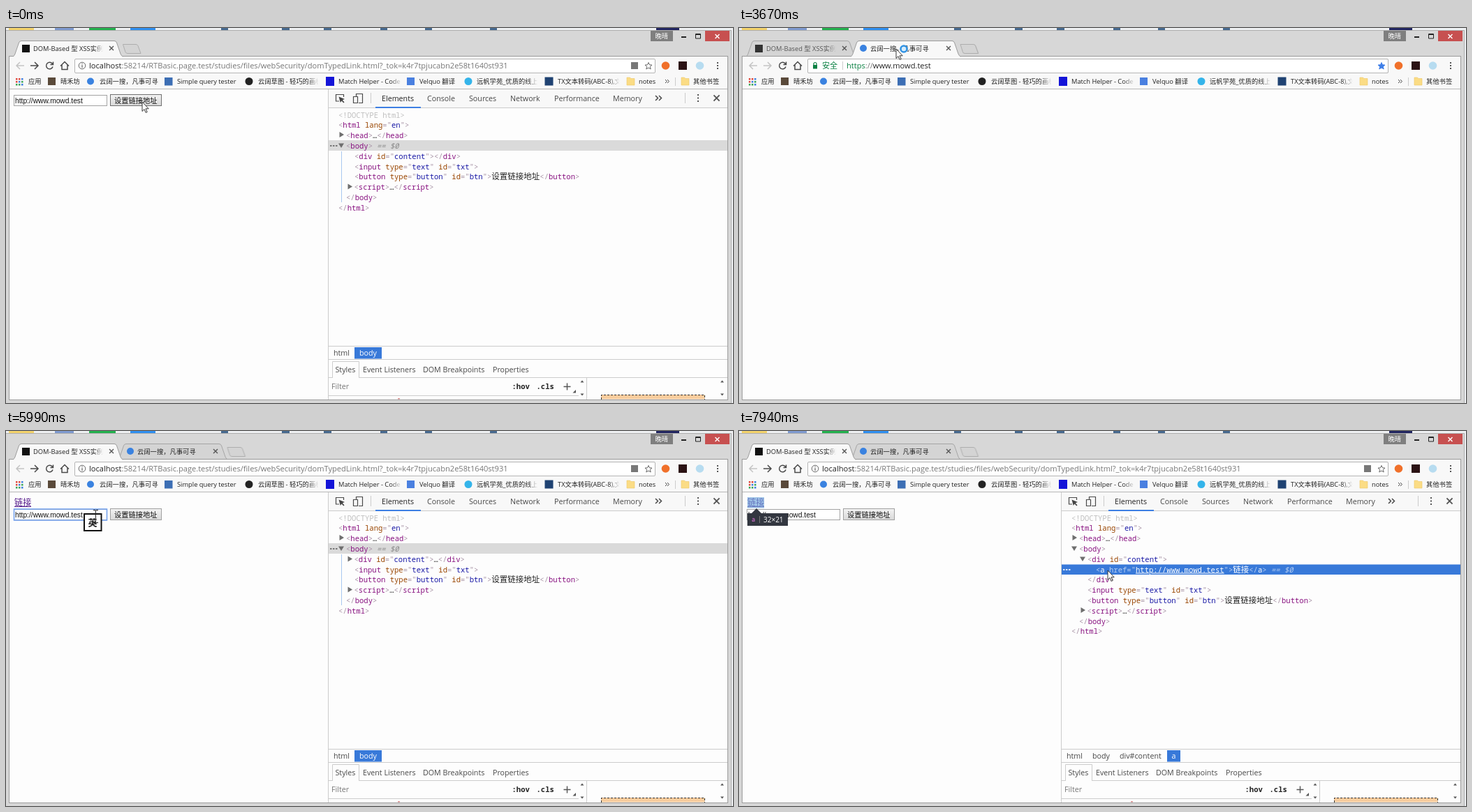
Animation of 1041x538 px, one loop 8000 ms. Source, as an HTML page:

```html
<!DOCTYPE html>
<html lang="zh">
<head>
<meta charset="utf-8">
<title>DOM-Based XSS</title>
<style>
html, body { margin: 0; width: 100%; height: 100%; overflow: hidden; background: #d7d7d7; }
svg { display: block; width: 100vw; height: 100vh; }
text { white-space: pre; font: 9.3px "Open Sans", "Noto Sans CJK SC", sans-serif; fill: #222; }
.url { font-size: 11.1px; fill: #777; }
.ui { font-size: 10.7px; fill: #484848; }
.field { font: 10.25px "Liberation Sans", "Noto Sans CJK SC", sans-serif; fill: #111; }
.link { font-size: 12.2px; fill: #551a8b; }
.code { font: 10.56px "Noto Sans Mono", "DejaVu Sans Mono", "Noto Sans CJK SC", monospace; fill: #a894a6; }
.t { fill: #881280; }
.n { fill: #994500; }
.v { fill: #1a1aa6; }
.c { fill: #222; }
.zh { font-size: 11.5px; fill: #222; }
.eq { fill: #888; font-style: italic; }
.mini { font-size: 8.65px; fill: #ee78e6; }
.size { font-size: 10px; }
.light, .light tspan { fill: #fff; }
.light .dim { fill: #b9d0f2; }
.line { fill: none; stroke: #ccc; }
.icon { fill: none; stroke: #4a4a4a; stroke-width: 1.5; }
.off { stroke: #c4c4c4; }

/* Everything runs on one 8 s clock: 1% = 80 ms. */
.on { animation: 8s step-end infinite; }
.bare { animation-name: bare; }
.linked { animation-name: linked; }
.closed { animation-name: closed; }
.open { animation-name: open; }
.form { animation-name: form; }
.tail { animation-name: tail; }
.tabbed { animation-name: tabbed; }
.plus { animation-name: plus; }
.loading { animation-name: loading; }
.loaded { animation-name: loaded; }
.away { animation-name: away; }
.focus { animation-name: focus; }
.ime { animation-name: ime; }
.hover-div { animation-name: hover-div; }
.hover-a { animation-name: hover-a; }
.sel-body { animation-name: sel-body; }
.sel-a { animation-name: sel-a; }
.body-line { animation-name: body-line; }
.arrow { animation-name: arrow; }
.hand { animation-name: hand; }
.busy { animation-name: busy; }
.beam { animation-name: beam; }
.flash { animation: flash 8s linear infinite; }
.spin { transform-origin: 178px 29px; animation: spin 1s linear infinite; }
.pointer { animation: pointer 8s infinite; }

@keyframes bare { 0% { opacity: 1 } 5.2%, 100% { opacity: 0 } }
@keyframes linked { 0% { opacity: 0 } 5.2%, 100% { opacity: 1 } }
@keyframes closed { 0%, 86.5%, 100% { opacity: 0 } 5.2% { opacity: 1 } }
@keyframes open { 0% { opacity: 0 } 86.5%, 100% { opacity: 1 } }
@keyframes form { 0% { transform: none } 5.2%, 100% { transform: translateY(16px) } }
@keyframes tail { 0% { transform: none } 86.5%, 100% { transform: translateY(29.6px) } }
@keyframes tabbed { 0% { opacity: 0 } 22.4%, 100% { opacity: 1 } }
@keyframes plus { 0% { transform: none } 22.4%, 100% { transform: translateX(149.5px) } }
@keyframes loading { 0%, 38.8%, 100% { opacity: 0 } 22.4% { opacity: 1 } }
@keyframes loaded { 0% { opacity: 0 } 38.8%, 100% { opacity: 1 } }
@keyframes away { 0%, 56.5%, 100% { opacity: 0 } 45.87% { opacity: 1 } }
@keyframes focus { 0%, 86.5%, 100% { opacity: 0 } 73.37% { opacity: 1 } }
@keyframes ime { 0%, 83.2%, 100% { opacity: 0 } 73.37% { opacity: 1 } }
@keyframes hover-div { 0%, 91.87%, 100% { opacity: 0 } 79.9% { opacity: 1 } }
@keyframes hover-a { 0% { opacity: 0 } 91.87%, 100% { opacity: 1 } }
@keyframes sel-body { 0% { opacity: 1 } 99.25%, 100% { opacity: 0 } }
@keyframes sel-a { 0% { opacity: 0 } 99.25%, 100% { opacity: 1 } }
@keyframes body-line { 0%, 99.25%, 100% { opacity: 0 } 86.5% { opacity: 1 } }
@keyframes arrow { 0%, 21%, 75%, 100% { opacity: 1 } 13.75%, 69.87% { opacity: 0 } }
@keyframes hand { 0%, 21%, 100% { opacity: 0 } 13.75% { opacity: 1 } }
@keyframes busy { 0%, 53.1%, 100% { opacity: 0 } 21% { opacity: 1 } }
@keyframes beam { 0%, 75%, 100% { opacity: 0 } 69.87% { opacity: 1 } }
@keyframes flash { 0%, 5.19% { opacity: 0 } 5.2% { opacity: 1 } 18%, 100% { opacity: 0 } }
@keyframes spin { to { transform: rotate(360deg) } }
@keyframes pointer {
  0% { transform: translate(195px, 106px) }
  6.93% { transform: translate(195px, 106px); animation-timing-function: steps(6, start) }
  17.21% { transform: translate(18px, 103px) }
  20.72% { transform: translate(18px, 103px); animation-timing-function: steps(7, start) }
  31.98% { transform: translate(171px, 186px) }
  32.25% { transform: translate(171px, 186px); animation-timing-function: steps(3, start) }
  37.28% { transform: translate(115px, 262px); animation-timing-function: steps(5, start) }
  45.68% { transform: translate(225px, 30px) }
  47.69% { transform: translate(225px, 30px); animation-timing-function: steps(4, start) }
  54.94% { transform: translate(100px, 27px) }
  58.47% { transform: translate(100px, 27px); animation-timing-function: steps(4, start) }
  66.34% { transform: translate(124px, 117px) }
  75.02% { transform: translate(124px, 117px); animation-timing-function: steps(4, start) }
  81.59% { transform: translate(510px, 181px); animation-timing-function: steps(3, start) }
  86.51% { transform: translate(489px, 181px) }
  91.87% { transform: translate(489px, 181px); animation-timing-function: steps(2, start) }
  95.62%, 100% { transform: translate(528px, 200px) }
}
</style>
</head>
<body>
<svg viewBox="0 0 1041 538" preserveAspectRatio="none">
<defs>
  <linearGradient id="fade"><stop stop-color="#f8f8f8" stop-opacity="0"/><stop offset=".65" stop-color="#f8f8f8"/></linearGradient>
  <linearGradient id="fadeOff"><stop stop-color="#d4d4d4" stop-opacity="0"/><stop offset=".65" stop-color="#d4d4d4"/></linearGradient>
  <linearGradient id="face" x2="0" y2="1"><stop stop-color="#f3f3f3"/><stop offset="1" stop-color="#d9d9d9"/></linearGradient>
  <path id="tab" d="M10 41Q12 40 13 37L18.5 21Q19.5 18.5 22 18.5H155Q157.5 18.5 158.5 21L164 37Q165 40 167.5 41"/>
  <path id="plus" d="M167.5 23.5H186Q188 23.5 189 25.5L193 36.5H174Q172 36.5 171 34.5Z" fill="#d4d4d4" stroke="#adadad"/>
  <path id="x" d="M-3-3L3 3M3-3L-3 3" fill="none" stroke="#555" stroke-width="1.4"/>
  <path id="star" d="M0-5L1.5-1.7 5-1.4 2.3.9 3.2 4.5 0 2.5-3.2 4.5-2.3.9-5-1.4-1.5-1.7Z"/>
  <path id="right" d="M-2.5-4L4 0-2.5 4Z" fill="#6e6e6e"/>
  <path id="down" d="M-4-2.5H4L0 4Z" fill="#6e6e6e"/>
  <path id="folder" d="M0 0H4.5L6 1.5H11V11H0Z" fill="#fbdc85" stroke="#ecc766" stroke-width=".6"/>
  <path id="back" d="M6 0H-5M0-5L-5 0 0 5"/>
  <path id="dots" d="M464 0h2.500v2h-2.500zM468 0h2.500v2h-2.500zM472 0h2.500v2h-2.500z"/>
  <g id="scroll" fill="#555"><path d="M-2.5 1.5L0-1.5 2.5 1.5Z"/><path d="M-2.5 17.5L0 20.5 2.5 17.5Z"/></g>
</defs>

<!-- desktop edge and window frame -->
<rect width="1041" height="538" fill="#eef0f2"/>
<path d="M4 0H40V3H4Z" fill="#f3d36b"/>
<path d="M70 0H97V3H70Z" fill="#7f9ad0"/>
<path d="M119 0H157V3H119Z" fill="#23b14d"/>
<path d="M178 0H214V3H178Z" fill="#2f8ff0"/>
<path d="M308 0h10v3h-10zM395 0h11v3h-11zM455 0h11v3h-11zM536 0h10v3h-10zM600 0h10v3h-10zM693 0h10v3h-10z" fill="#46698f"/>
<path d="M931 0H964V3H931Z" fill="#20245f"/>
<rect x="-1" y="3.5" width="1039.5" height="540" fill="#d7d7d7" stroke="#adadad"/>
<rect x="923" y="4" width="32" height="15" fill="#7f7f7f"/>
<text class="light" x="929.5" y="15">晚晴</text>
<path d="M967 13H974" stroke="#222" stroke-width="2"/>
<path d="M987.5 8.5H994.5V15H987.5ZM987 9.5H995" fill="none" stroke="#222"/>
<rect x="1001" y="4" width="35" height="15" fill="#c75050"/>
<path d="M1015.5 9L1021.5 15M1021.5 9L1015.5 15" stroke="#fff" stroke-width="1.4"/>
<rect x="4.5" y="40.5" width="1029" height="493" fill="#fdfdfd" stroke="#9b9b9b"/>

<!-- tabs -->
<g class="on tabbed">
  <use href="#tab" x="150" fill="#d4d4d4" stroke="#a5a5a5"/>
  <path d="M160 40.5H320" stroke="#9b9b9b"/>
  <use href="#x" x="300" y="29"/>
</g>
<g class="on loading">
  <path class="spin" d="M174.5 27A4 4 0 0 1 177 25" fill="none" stroke="#888" stroke-width="1.2"/>
  <text x="188" y="32.5">正在加载...</text>
</g>
<g class="on loaded">
  <circle cx="178" cy="29" r="5" fill="#3a82e0"/>
  <text x="188" y="32.5">云阔一搜，凡事可寻</text>
</g>
<use href="#plus" class="on plus"/>
<rect x="5" y="41" width="1028" height="47" fill="#f8f8f8"/>
<use href="#tab" fill="#f8f8f8" stroke="#9b9b9b"/>
<rect x="23" y="24" width="11" height="11" fill="#111"/>
<text x="39" y="32.5">DOM-Based 型 XSS实例</text>
<rect x="126" y="22" width="20" height="15" fill="url(#fade)"/>
<use href="#x" x="151" y="29"/>

<!-- toolbar -->
<use href="#back" x="20" y="54" class="icon off"/>
<use href="#back" transform="translate(41 54) scale(-1 1)" class="icon"/>
<path class="icon" d="M66.5 51.5A4.8 4.8 0 1 0 67 55.5M67.5 48.5V52.5H63.5"/>
<path class="icon" d="M78 54.5L84 48.5 90 54.5M80 53V59.5H88V53"/>
<rect x="98.5" y="44.5" width="831" height="20" rx="1.5" fill="#fff" stroke="#b5b5b5"/>
<circle cx="109" cy="54" r="4.8" fill="none" stroke="#666"/>
<path d="M109 53V57M109 50.8V52" stroke="#666" stroke-width="1.2"/>
<text class="url" x="119" y="58"><tspan class="c">localhost</tspan>:58214/RTBasic.page.test/studies/files/webSecurity/domTypedLink.html?_tok=k4r7tpjucabn2e58t1640st931</text>
<rect x="895" y="49" width="10" height="10" fill="#777"/>
<use href="#star" x="920" y="54.5" fill="none" stroke="#666"/>
<circle cx="944.5" cy="54" r="5.8" fill="#f0702a"/>
<rect x="963" y="48" width="12" height="12" fill="#2b1214"/>
<circle cx="993.5" cy="54" r="5.8" fill="#b7dcf0"/>
<path d="M1018 49h2v2h-2zM1018 53h2v2h-2zM1018 57h2v2h-2z" fill="#555"/>

<!-- bookmarks -->
<g transform="translate(14 72)">
  <path d="M0 0h2.5v2.5h-2.5zM4 0h2.5v2.5h-2.5zM0 4h2.5v2.5h-2.5z" fill="#e04a3f"/>
  <path d="M8 0h2.5v2.5h-2.5zM4 4h2.5v2.5h-2.5zM8 8h2.5v2.5h-2.5z" fill="#3f7fe0"/>
  <path d="M8 4h2.5v2.5h-2.5zM0 8h2.5v2.5h-2.5zM4 8h2.5v2.5h-2.5z" fill="#3aa757"/>
</g>
<text y="80.3"><tspan x="32">应用</tspan><tspan x="78">晴禾坊</tspan><tspan x="134">云阔一搜，凡事可寻</tspan><tspan x="245">Simple query tester</tspan><tspan x="361">云阔草图 - 轻巧的画板</tspan><tspan x="476">Match Helper - Code</tspan><tspan x="592">Velquo 翻译</tspan><tspan x="674">远帆学苑_优质的线上</tspan><tspan x="790">TX文本转码(ABC-8),文</tspan><tspan x="906">notes</tspan><tspan x="984">其他书签</tspan></text>
<g fill="url(#fade)"><path d="M432 69h24v16h-24z"/><path d="M551 69h24v16h-24z"/><path d="M747 69h22v16h-22z"/><path d="M863 69h24v16h-24z"/></g>
<rect x="60" y="71" width="11" height="11" fill="#5a4a3a"/>
<circle cx="121" cy="76.5" r="5" fill="#3a82e0"/>
<rect x="227" y="71" width="11.5" height="11.5" fill="#3c6eb4"/>
<circle cx="348" cy="76.5" r="5.5" fill="#222"/>
<rect x="458" y="70" width="12" height="13" fill="#1414d8"/>
<rect x="574" y="71" width="11" height="11" fill="#4a80e0"/>
<circle cx="662" cy="76.5" r="5.5" fill="#34b4ea"/>
<rect x="771.5" y="70.5" width="12" height="12" fill="#1f4272"/>
<use href="#folder" x="889" y="71"/><use href="#folder" x="967" y="71"/>
<path d="M944 74L946.5 76.5 944 79M947 74L949.5 76.5 947 79" fill="none" stroke="#444"/>
<path class="line" d="M958.5 71V83"/>
<path d="M5 87.5H1033" stroke="#b8b8b8"/>

<!-- page -->
<g class="on linked">
  <text class="link" x="12" y="107.3">链接</text>
  <path d="M12 108.5H36" stroke="#551a8b"/>
</g>
<g class="on form">
  <rect x="11.5" y="96.5" width="133" height="15" fill="#fff" stroke="#a3a3a3"/>
  <rect class="on focus" x="11.5" y="96" width="133" height="16" fill="none" stroke="#6f9fee" stroke-width="1.5"/>
  <text class="field" x="13" y="107.5">http://www.mowd.test</text>
  <rect x="149.5" y="95.5" width="73" height="16" fill="url(#face)" stroke="#a0a0a0"/>
  <rect class="on bare" x="149.5" y="95.5" width="73" height="16" fill="none" stroke="#707070"/>
  <text class="field" x="155" y="107.7">设置链接地址</text>
</g>
<g class="on hover-div">
  <rect x="12" y="95" width="443" height="15.5" fill="#6fa8dc" fill-opacity=".66"/>
  <path d="M12 118H18L25 111 32 118H127V136H12Z" fill="#333740"/>
  <text class="code mini" x="18" y="130">div#content</text>
  <path d="M81.5 122V132" stroke="#777"/>
  <text class="light size" x="86" y="130.5">574×21</text>
</g>
<g class="on hover-a">
  <rect x="12" y="95" width="24" height="15.5" fill="#6fa8dc" fill-opacity=".66"/>
  <path d="M12 118H18L25 111 32 118H70V136H12Z" fill="#333740"/>
  <text class="code mini" x="18" y="130">a</text>
  <path d="M29.5 122V132" stroke="#777"/>
  <text class="light size" x="35" y="130.5">32×21</text>
</g>
<g class="on ime">
  <rect x="112" y="119" width="24.5" height="24" fill="#fff" stroke="#111" stroke-width="2"/>
  <text x="117.5" y="135.5" style="font-size:13px;font-weight:700">英</text>
</g>

<!-- developer tools -->
<rect x="462" y="88" width="571" height="26" fill="#f8f8f8"/>
<path class="line" d="M461.5 88V533M462 114.5H1033"/>
<path class="icon" style="stroke-width:1.2" d="M477 105H472.5V95.5H483.5V99M501.5 98V94.5H510.5V107.5H505M497.5 98.5H503.5V107.5H497.5Z"/>
<path d="M476.5 98.5L485 102 481.8 103.3 484.5 106.5 483.3 107.5 480.6 104.4 478.8 107Z" fill="#444"/>
<path class="line" d="M522.5 93V108M972.5 93V108"/>
<text class="ui" y="104.8"><tspan x="538" class="c">Elements</tspan><tspan x="603">Console</tspan><tspan x="663">Sources</tspan><tspan x="722">Network</tspan><tspan x="785">Performance</tspan><tspan x="869">Memory</tspan></text>
<rect x="529" y="113" width="65" height="2" fill="#3d7fe3"/>
<path class="icon" d="M930 97L933.5 100.5 930 104M935 97L938.5 100.5 935 104"/>
<path d="M990 95h2v2h-2zM990 99.5h2v2h-2zM990 104h2v2h-2z" fill="#555"/>
<use href="#x" transform="translate(1017.5 100.5) scale(1.35)"/>

<!-- element tree -->
<g class="on sel-body">
  <rect x="462" y="161" width="571" height="15" fill="#dadada"/>
  <use href="#dots" y="168" fill="#777"/>
  <path d="M480.5 177V250" stroke="#a8c8f0"/>
  <text class="code eq" x="531" y="172.7">== $0</text>
</g>
<path class="on body-line" d="M480.5 250V280" stroke="#a8c8f0"/>
<rect class="on hover-div" x="465" y="177" width="564" height="14" rx="3" fill="#ebf2fc"/>
<rect class="on hover-a" x="465" y="192" width="564" height="14" rx="3" fill="#ebf2fc"/>
<text class="code" x="476" y="128.5" style="fill:#c0c0c0">&lt;!DOCTYPE html&gt;</text>
<text class="code" x="476" y="143.3">&lt;<tspan class="t">html</tspan> <tspan class="n">lang</tspan>="<tspan class="v">en</tspan>"&gt;</text>
<use href="#right" x="480" y="153"/>
<text class="code" x="487" y="158">&lt;<tspan class="t">head</tspan>&gt;<tspan class="c">…</tspan>&lt;/<tspan class="t">head</tspan>&gt;</text>
<use href="#down" x="480" y="168"/>
<text class="code" x="487" y="172.7">&lt;<tspan class="t">body</tspan>&gt;</text>
<text class="code on bare" x="499" y="187.7">&lt;<tspan class="t">div</tspan> <tspan class="n">id</tspan>="<tspan class="v">content</tspan>"&gt;&lt;/<tspan class="t">div</tspan>&gt;</text>
<g class="on closed">
  <use href="#right" x="492" y="183.5"/>
  <text class="code" x="498.5" y="187.7">&lt;<tspan class="t">div</tspan> <tspan class="n">id</tspan>="<tspan class="v">content</tspan>"&gt;<tspan class="c">…</tspan>&lt;/<tspan class="t">div</tspan>&gt;</text>
</g>
<g class="flash">
  <rect x="504" y="177.5" width="20" height="13.5" rx="2" fill="#881280"/>
  <text class="code light" x="504.8" y="187.7">div</text>
</g>
<g class="on open">
  <use href="#down" x="492" y="183"/>
  <text class="code" x="499" y="187.7">&lt;<tspan class="t">div</tspan> <tspan class="n">id</tspan>="<tspan class="v">content</tspan>"&gt;</text>
  <text class="code" x="511" y="202.5">&lt;<tspan class="t">a</tspan> <tspan class="n">href</tspan>="<tspan class="v" text-decoration="underline">http://www.mowd.test</tspan>"&gt;<tspan class="zh">链接</tspan>&lt;/<tspan class="t">a</tspan>&gt;</text>
  <text class="code" x="499" y="217.3">&lt;/<tspan class="t">div</tspan>&gt;</text>
</g>
<g class="on sel-a">
  <rect x="462" y="191.5" width="571" height="14.5" fill="#3879d9"/>
  <use href="#dots" y="198" fill="#dbe7fa"/>
  <text class="code light" x="511" y="202.5"><tspan class="dim">&lt;</tspan>a <tspan class="dim">href="</tspan><tspan text-decoration="underline">http://www.mowd.test</tspan><tspan class="dim">"&gt;</tspan><tspan class="zh">链接</tspan><tspan class="dim">&lt;/</tspan>a<tspan class="dim">&gt;</tspan><tspan class="eq dim"> == $0</tspan></text>
</g>
<g class="on tail">
  <text class="code" x="499" y="202.5">&lt;<tspan class="t">input</tspan> <tspan class="n">type</tspan>="<tspan class="v">text</tspan>" <tspan class="n">id</tspan>="<tspan class="v">txt</tspan>"&gt;</text>
  <text class="code" x="499" y="217.3">&lt;<tspan class="t">button</tspan> <tspan class="n">type</tspan>="<tspan class="v">button</tspan>" <tspan class="n">id</tspan>="<tspan class="v">btn</tspan>"&gt;<tspan class="zh">设置链接地址</tspan>&lt;/<tspan class="t">button</tspan>&gt;</text>
  <use href="#right" x="492" y="227.5"/>
  <text class="code" x="498.5" y="232.2">&lt;<tspan class="t">script</tspan>&gt;<tspan class="c">…</tspan>&lt;/<tspan class="t">script</tspan>&gt;</text>
  <text class="code" x="487" y="247">&lt;/<tspan class="t">body</tspan>&gt;</text>
  <text class="code" x="476" y="261.8">&lt;/<tspan class="t">html</tspan>&gt;</text>
</g>

<!-- breadcrumbs and styles -->
<path class="line" d="M462 456.5H1033M462 475.5H1033M462 501.5H1033M462 527.5H820M831.5 502V533"/>
<text class="ui" y="469.8"><tspan x="469">html</tspan><tspan x="506">body</tspan></text>
<g class="on sel-body">
  <rect x="499" y="458" width="39" height="16.5" fill="#3879d9"/>
  <text class="ui light" x="506" y="469.8">body</text>
</g>
<g class="on sel-a">
  <text class="ui" x="545" y="469.8">div#content</text>
  <rect x="613" y="458" width="19" height="16.5" fill="#3879d9"/>
  <text class="ui light" x="619.5" y="469.8">a</text>
</g>
<path d="M467.5 502V478.5H505.5V502" fill="#fdfdfd" stroke="#ccc"/>
<text class="ui" y="493.8"><tspan x="471.5">Styles</tspan><tspan x="511">Event Listeners</tspan><tspan x="597">DOM Breakpoints</tspan><tspan x="697">Properties</tspan></text>
<text class="ui" x="466" y="518.3" style="fill:#777">Filter</text>
<text class="code c" y="518" style="font-weight:700"><tspan x="724.5">:hov</tspan><tspan x="759.5">.cls</tspan></text>
<path d="M798.5 514.5H808.5M803.5 509.5V519.5" stroke="#555" stroke-width="1.4"/>
<path d="M816 519V523.5H811.5Z" fill="#555"/>
<use href="#scroll" x="825" y="507"/><use href="#scroll" x="1025.5" y="507"/>
<rect x="561" y="531" width="3" height="1.5" fill="#d58a8a"/>
<rect x="852" y="526" width="148.5" height="6.5" fill="#f9cc9d"/>
<path d="M852.5 533V526.5H1000.5V533" fill="none" stroke="#333" stroke-dasharray="3 2"/>

<!-- second tab in front -->
<g class="on away">
  <rect x="5" y="17" width="315" height="23" fill="#d7d7d7"/>
  <use href="#tab" fill="#d4d4d4" stroke="#a5a5a5"/>
  <rect x="23" y="24" width="11" height="11" fill="#333"/>
  <text x="39" y="32.5" style="fill:#555">DOM-Based 型 XSS实例</text>
  <rect x="126" y="22" width="20" height="15" fill="url(#fadeOff)"/>
  <use href="#x" x="151" y="29"/>
  <path d="M5 41.5H200" stroke="#f8f8f8"/><path d="M5 40.5H200" stroke="#9b9b9b"/>
  <use href="#tab" x="150" fill="#f8f8f8" stroke="#9b9b9b"/>
  <use href="#plus" x="149.5"/>
  <circle cx="178" cy="29" r="5" fill="#3a82e0"/>
  <text x="188" y="32.5">云阔一搜，凡事可寻</text>
  <use href="#x" x="300" y="29"/>
  <rect x="33" y="47" width="17" height="14" fill="#f8f8f8"/>
  <use href="#back" transform="translate(41 54) scale(-1 1)" class="icon off"/>
  <rect x="98.5" y="44.5" width="831" height="20" rx="1.5" fill="#fff" stroke="#b5b5b5"/>
  <path d="M106 53H112V58.5H106Z" fill="#0b8043"/>
  <path d="M107 53V51.5A2 2 0 0 1 111 51.5V53" fill="none" stroke="#0b8043" stroke-width="1.2"/>
  <text class="url" x="119" y="58" style="fill:#0b8043">安全</text>
  <path class="line" d="M148.5 48V60"/>
  <text class="url" x="154" y="58"><tspan fill="#0b8043">https</tspan>://<tspan class="c">www.mowd.test</tspan></text>
  <use href="#star" x="920" y="54.5" fill="#3f7fe8" stroke="#3f7fe8"/>
  <rect x="5" y="88" width="1028" height="445" fill="#fdfdfd"/>
</g>

<g class="pointer">
  <path class="on arrow" d="M0 0V13.5L3 10.6 5.2 15.4 7.2 14.5 5 9.8H9.2Z" fill="#fff" stroke="#222" stroke-width=".9"/>
  <path class="on hand" d="M-1.4 11V1.4A1.4 1.4 0 0 1 1.4 1.4V7.5C4 7 9 8 9 10V15L7 20H0L-4.5 12C-4.5 10-2.5 10-1.4 12Z" fill="#fff" stroke="#222"/>
  <circle class="on busy" cx="11" cy="0" r="4.5" fill="#d5ecfb" stroke="#2f92e4" stroke-width="2.5"/>
  <path class="on beam" d="M1-3.5H4L4.5-3 5-3.5H8M4.5-3V14M1 14.5H4L4.5 14 5 14.5H8" fill="none" stroke="#222"/>
</g>
</svg>
</body>
</html>
```
